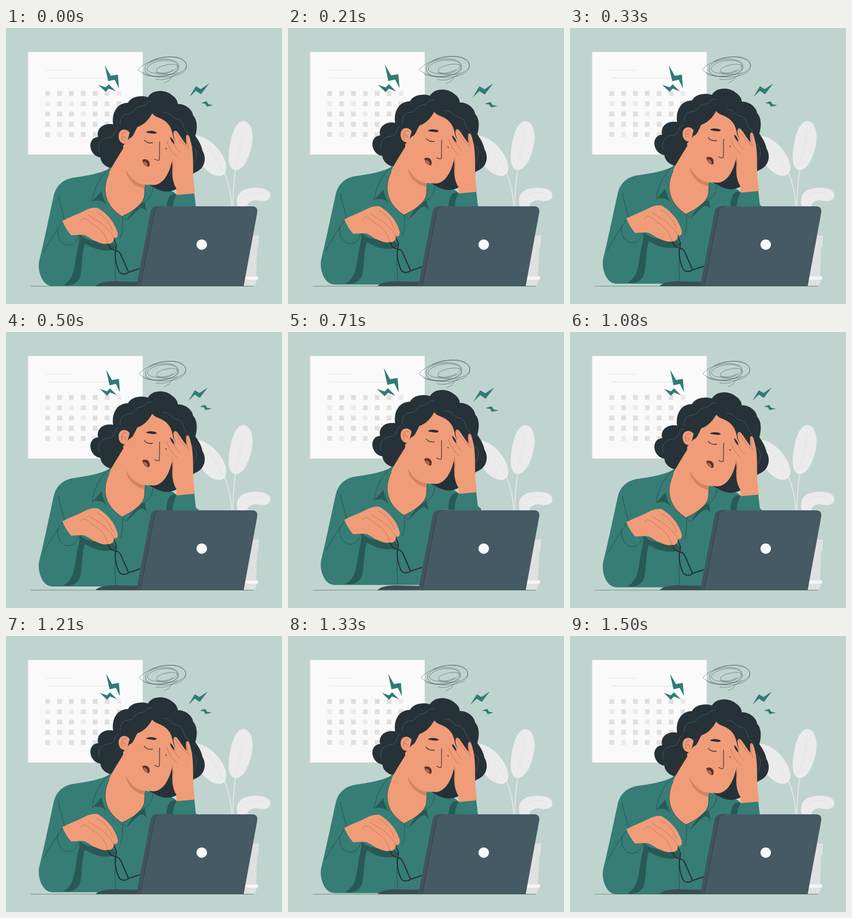
Animation of 500x500 px, one loop 1.54 s. Source, as an HTML page with a canvas:

```html
<!DOCTYPE html>
<html lang="en">
<head>
<meta charset="utf-8">
<style>
html, body { margin: 0; width: 100%; height: 100%; overflow: hidden; background: #c0d4cf; }
canvas { display: block; width: 500px; height: 500px; }
</style>
</head>
<body>
<canvas></canvas>
<script>
const LOOP = 1540, LEAD = 42;
const BG = '#c0d4cf', TEAL = '#367d76', SHADE = '#285a55', SKIN = '#f09c78',
  INK = '#263238', SLATE = '#455a64', PALE = '#ebebeb', GREY = '#e0e0e0';

const canvas = document.querySelector('canvas');
const ctx = canvas.getContext('2d');
const dpr = window.devicePixelRatio || 1;
canvas.width = canvas.height = 500 * dpr;

function fill(d, color) {
  ctx.fillStyle = color;
  ctx.fill(new Path2D(d));
}

function line(d, color = INK, width = 0.6) {
  ctx.strokeStyle = color;
  ctx.lineWidth = width;
  ctx.stroke(new Path2D(d));
}

function dot(x, y, r, color) {
  ctx.fillStyle = color;
  ctx.beginPath();
  ctx.arc(x, y, r, 0, 7);
  ctx.fill();
}

function scaled(cx, cy, s, draw) {
  ctx.save();
  ctx.translate(cx, cy);
  ctx.scale(s, s);
  ctx.translate(-cx, -cy);
  draw();
  ctx.restore();
}

function calendar() {
  fill('M39.500 43H248V229.500H39.500Z', GREY);
  fill('M40.500 44H247.500V229H40.500Z', '#fafafa');
  line('M72 76.500H118M76 90.500H199', GREY, 0.8);
  const light = ['0,6', '1,0', '1,2', '2,3', '4,1'];
  for (let row = 0; row < 5; row++) {
    for (let col = 0; col < 7; col++) {
      ctx.fillStyle = light.includes(row + ',' + col) ? PALE : GREY;
      ctx.fillRect(71.2 + col * 21.5, 114.2 + row * 18.6, 8.7, 8.7);
    }
  }
}

function plant() {
  line('M360 215C388 235 407 275 409 325M427 200C417 240 411 280 411 325M470 300C440 297 424 303 420 325', PALE, 1.4);
  fill('M335 196C352 190 381 208 394 234C402 250 401 267 387 268C368 268 350 247 340 222Z', PALE);
  fill('M430 168.500C443 169 448 187 446.500 205C443 230 432 255 418 257.500C405 258 402 243 404 223C407 196 415 169 430 168.500Z', PALE);
  fill('M420 325C416 308 420 294 440 290.500C462 287 479 292 479 303C479 314 464 315 453 312C443 312 438 317 436 325Z', PALE);
  line('M345 200C368 218 385 240 391 257M429 186C427 208 420 235 414 250M427 308C440 297 455 297 466 300', '#dcdcdc', 0.7);
  fill('M425 397H455L453 451H425Z', GREY);
  fill('M440 376H458.500L457 397H440Z', GREY);
  fill('M425 450H457L456 456H425Z', '#f5f5f5');
  fill('M425 456H455L450 467H425Z', GREY);
}

function scribble() {
  line('M240.500 75.500C253 61 284 51 306 53C329 56 332 75 315 83C293 93 255 89 240.500 75.500Z'
    + 'M253 76C249 63 278 54 298 58C319 62 315 78 297 84C278 91 254 88 253 76Z'
    + 'M259 69C267 60 294 55 307 63C318 72 297 84 278 83C261 82 251 76 259 69Z'
    + 'M248 82C259 91 306 88 312 74C315 61 283 66 274 74C267 84 293 83 303 75'
    + 'M262 61C284 48 320 52 325 65C330 80 298 90 271 80M271 92C287 96 303 89 310 80M286 99C292 97 297 94 299 90', INK, 0.45);
}

function bolts() {
  fill('M181.500 68.500L192 87L204.500 85L206.500 109L199 94L187.500 96.500Z'
    + 'M170 103L183 107.500L188.500 102L201 114.500L188.500 109.500L183 115.500Z'
    + 'M330.500 124.500L342 105.500L350.500 110.500L365.500 100.500L351 119.500L342 113.500Z'
    + 'M351 135L361 132L364 137L372.500 139L361.500 141.500L358.500 136.500Z', '#2f7c74');
}

function shirt() {
  fill('M191 253C174 264 146 268 120 272C101 276 91 287 86.500 304C78 343 67 396 60 423C57 439 64 466 83 468H350V330L344 325L341 299L309 302L303 297C290 293 267 288 250 283Z', TEAL);
  fill('M309 302C298 298 290 309 291 332H302C302 318 305 311 309 302Z', SHADE);
  fill('M133 374C149 390 169 386 191 386L201 398C186 409 160 402 143 391C136 411 139 441 133 454C126 467 113 468 104 466C121 457 123 441 127 416C129 398 134 390 133 374Z', SHADE);
  line('M95 303C98 323 104 336 106 350M104 350C88 373 76 391 68 407M94 363C91 381 101 394 113 394C124 394 129 385 132 376M211 342C211 354 212 369 207 381M199 405C196 427 198 448 199 467');
}

function hair() {
  fill('M203 255C185 257 172 247 171 235C156 233 149 215 155 205C158 200 162 198 167 198C163 183 176 172 194 175C191 156 200 136 221 136C227 124 246 122 257 126C264 113 286 111 299 121C307 126 311 132 311 138C326 138 338 149 339 159C347 167 347 183 343 196C348 203 354 212 356 223C364 236 361 256 341 263L313 289C302 299 285 299 271 291L240 275Z', INK);
  line('M169 224C164 207 176 200 187 199C198 199 195 184 204 180M207 175C206 162 214 156 222 156C232 156 232 144 243 143C254 142 255 132 264 134M284 153C297 151 299 164 309 165C324 168 319 182 327 188C338 198 326 206 337 215C350 225 344 236 341 245', '#536a75', 0.7);
}

function face() {
  fill('M222 203C211 221 196 244 186 263C175 285 176 303 185 317C191 327 201 336 210 342C231 332 252 318 251 300L252 284Z', SKIN);
  fill('M224 200C231 198 233 188 238 180C250 176 259 166 265 155C270 164 287 162 297 179C308 199 304 235 298 252C291 273 280 285 267 285C250 285 231 276 217 258L212 214Z', SKIN);
  fill('M217 257C226 274 238 283 252 284.500L251 291.500C237 289 219 277 217 257Z', '#d28460');
  fill('M224 190C216 180 204 185 204 196C204 207 211 212 219 210Z', SKIN);
  line('M218 190C211 188 207 195 211 204M211 198C214 195 217 198 216 202', '#9e5a43', 0.7);
  fill('M254 188.500C260 186 268 186.500 273 189.500C273 191 271 192 268 192C262 191 258 191 254 189.500Z', INK);
  line('M250 203C253 208 260 210 266 208.500M289 218C291 221 294 222 297 221', INK, 1.2);
  line('M278.500 206C277.500 219 279 231 277.500 240C276 242 272 239 269 238', INK, 1.1);
  fill('M247 239.500C254 236 262 241 260 250C259 252 257 252.500 256 251.500C252 250 248 246 247 239.500Z', '#5b332b');
  fill('M249 242.500C254 242 257 246 256.500 251C253 250 250 247 249 242.500Z', '#bd6a50');
}

function collar() {
  fill('M191 252C174 265 159 288 156 315L170 303C174 313 178 319 184 323C190 331 199 337 210 342C179 322 173 293 187 263Z', TEAL);
  fill('M156 315L173 296C175 307 179 317 185 323C176 313 166 311 156 315Z', SHADE);
  fill('M252 284L266 290C266 303 260 315 252 316C235 326 224 340 218 350L210 342C231 332 252 318 251 300Z', TEAL);
  fill('M218 350C226 336 236 323 251 315L255 334C250 326 245 325 238 331C231 337 225 345 218 350Z', SHADE);
  line('M189 253C173 267 159 288 156 315M187 264C173 293 179 322 210 342C231 332 252 318 251 300L252 286M266 290C265 302 260 311 251 315M210 342L218 350');
}

function restingHand() {
  ctx.lineJoin = 'round';
  line('M184 388L189 400L199 404M194 380L200 394L199 404C204 404 207 408 209 413L222 443C216 448 207 447 204 440C199 429 196 411 199 404M222 443L243 436', INK, 2.1);
  fill('M102 350C115 343 130 338 143 331C153 326 162 325 167 327C182 336 197 352 202 371C204 379 200 382 195 380C197 387 190 393 184 391C177 394 166 388 158 385C148 378 143 375 137 375L118 376C112 369 106 360 102 350Z', SKIN);
  line('M135 351C140 340 149 349 157 356C168 363 179 371 184 389M149 339C158 347 173 352 181 362C189 370 192 374 195 380M164 334C180 342 188 354 193 368', '#a85f47', 0.6);
}

function raisedHand() {
  fill('M309 303L308.500 291C304 284 301 274 301 258C303 245 299 236 294 228C290 219 288 208 291 205C296 203 298 211 301 216C298 208 297 200 299 197C303 194 304 202 308 207C303 198 302 189 305 187C310 184 314 196 327 212C326 203 325 196 328 194C332 194 334 203 336 212C339 226 339 242 339 258C339 276 341 288 342 300Z', SKIN);
  line('M291 205C295 218 303 229 310 234M299 198C303 211 310 222 316 226M305 187C311 199 322 211 328 217M327 195C327 205 329 214 331 220M301 238C304 247 301 258 302 268', '#a85f47', 0.6);
  fill('M297 198C302 200 305 206 305 211C302 209 298 204 297 198Z', INK);
}

function laptop() {
  fill('M162 468C167 461 181 459 197 459L240 460V468Z', '#3a4c56');
  fill('M262 333C264 326 267 323 274 323H300L270 468H236Z', '#41545f');
  fill('M283 323H446C454 323 456 328 455 335L430.500 468H243L269 333C271 326 275 323 283 323Z', SLATE);
  line('M283 323C275 323 271 326 269 333L243 468', INK, 0.6);
  dot(354.6, 392.4, 9.5, '#fafafa');
  line('M45 467.700H243M430 467.700H449', '#60756f', 0.8);
}

// Two beats per loop, followed by a rest.
function beat(p) {
  if (p < 0.1) return p / 0.1;
  if (p < 0.3) return (0.3 - p) / 0.2;
  return Math.max(0, 1 - Math.abs(p - 0.5) / 0.1);
}

function draw(now) {
  const p = ((now + LEAD) % LOOP) / LOOP;
  const lift = -10 * (1 - Math.abs(2 * p - 1));
  const zoom = 1 + 0.1 * beat(p);

  ctx.setTransform(dpr, 0, 0, dpr, 0, 0);
  ctx.fillStyle = BG;
  ctx.fillRect(0, 0, 500, 500);
  calendar();
  plant();
  scaled(283, 75.7, zoom, scribble);
  scaled(271.5, 104, zoom, bolts);

  ctx.save();
  ctx.translate(0, lift);
  [shirt, hair, face, collar, restingHand, raisedHand].forEach(part => part());
  ctx.restore();
  laptop();
}

const start = performance.now();
function tick() {
  draw(performance.now() - start);
  requestAnimationFrame(tick);
}
tick();
</script>
</body>
</html>
```
